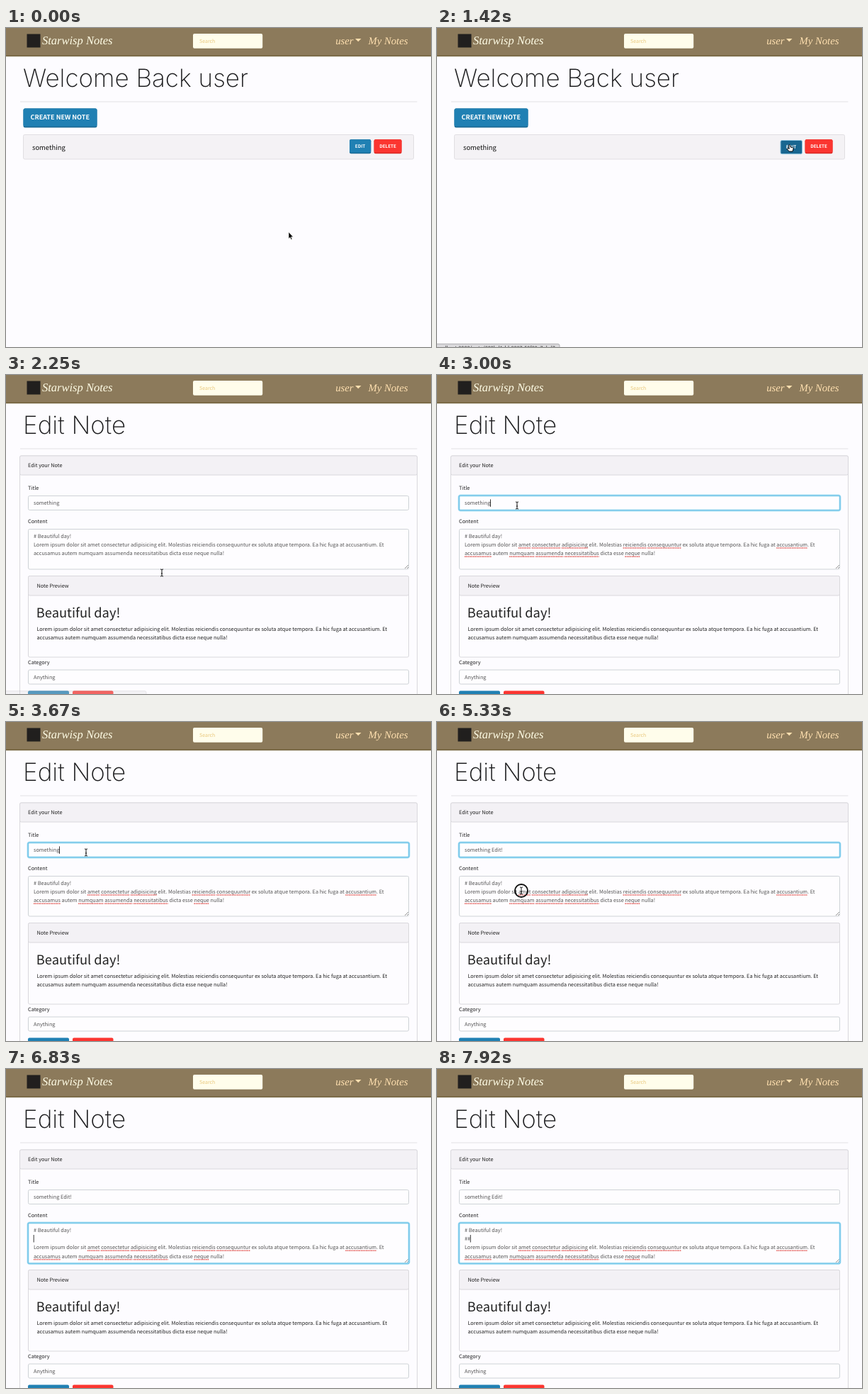
Recreate the animation shown at these times as an HTML page. Size 600 by 450 pixels, loop 8 s.

```html
<!DOCTYPE html>
<html lang="en">
<head>
<meta charset="utf-8">
<title>Note editor</title>
<style>
  html, body { margin: 0; width: 100%; height: 100%; overflow: hidden; background: #fdfcff; }
  svg { display: block; width: 100%; height: 100%; }
  text {
    font: 7.3px "Noto Sans CJK JP", "Noto Sans CJK SC", "Noto Sans CJK", "Open Sans", sans-serif;
    text-rendering: geometricPrecision; white-space: pre; fill: #222;
  }
  text.heading { font: 150 35px Inter, Roboto, sans-serif; fill: #1c1c1e; }
  text.script { font: italic 14.7px "Liberation Serif", "Noto Serif", serif; fill: #ffe0b0; }
  text.brand { font-size: 16.5px; fill: #fffde6; }
  text.button { font-weight: 700; font-size: 6.3px; fill: #fff; text-anchor: middle; }
  text.large { font-size: 9.05px; }
  .value { fill: #555; }
  .panel { fill: #fdfcff; stroke: #d9d8dc; }
  .bar { fill: #f3f1f5; stroke: #d9d8dc; }
  .field { fill: #fefdff; stroke: #ced3d6; }
  .blue { fill: #2080b3; }
  .blue-edge { fill: #1a6a95; }
  .red { fill: #fb3530; }
  .red-edge { fill: #d92823; }
  .ring rect { fill: none; stroke: #72c6ea; stroke-width: 1.6; }
  .ring .glow { stroke: #a9e0f5; stroke-width: 3.4; opacity: .65; }
  .wavy { stroke: #e0504c; stroke-width: 1.5; stroke-dasharray: 1.5 .9; }
</style>
</head>
<body>
<svg viewBox="0 0 600 450" preserveAspectRatio="none">
  <rect width="600" height="450" fill="#fdfcff"/>

  <g id="home">
    <text class="heading" x="24" y="83">Welcome Back user</text>
    <rect class="blue-edge" x="24.5" y="113.5" width="104" height="27" rx="2.5"/>
    <rect class="blue" x="24.5" y="113.5" width="104" height="25.3" rx="2.5"/>
    <text class="button large" x="76.3" y="129.2">CREATE NEW NOTE</text>
    <rect x="24.5" y="150.5" width="551" height="34.5" rx="2" fill="#f4f2f5" stroke="#e0dee2"/>
    <text x="37" y="171.6" style="font-size:9.42px;fill:#111">something</text>
    <g id="editButton">
      <rect class="blue-edge" x="485" y="157.3" width="30.2" height="20" rx="2"/>
      <rect class="blue" x="485" y="157.3" width="30.2" height="18.4" rx="2"/>
      <text class="button" x="500" y="168.8">EDIT</text>
    </g>
    <g id="editHover">
      <rect x="485" y="158.5" width="30.5" height="19.2" rx="2" fill="#186690" stroke="#8fc4de"/>
      <text class="button" x="500" y="170">EDIT</text>
    </g>
    <rect class="red-edge" x="519.6" y="157.3" width="38.9" height="20" rx="2"/>
    <rect class="red" x="519.6" y="157.3" width="38.9" height="18.4" rx="2"/>
    <text class="button" x="539" y="168.8">DELETE</text>
  </g>

  <g id="edit">
    <text class="heading" x="24" y="83">Edit Note</text>
    <rect class="panel" x="19.5" y="114" width="561" height="360" rx="2"/>
    <rect class="bar" x="19.5" y="114" width="561" height="27" rx="2"/>
    <text x="31" y="130">Edit your Note</text>
    <text x="31" y="161.7">Title</text>
    <rect class="field" x="31.5" y="170.5" width="537" height="20" rx="2"/>
    <text x="31" y="208.7">Content</text>
    <rect class="field" x="31.5" y="217.5" width="537" height="56.5" rx="2"/>
    <path d="M563 273l5-5M566 273l2-2" stroke="#777" stroke-width=".8"/>
    <g id="titleRing" class="ring">
      <rect class="glow" x="31" y="170" width="538" height="21" rx="2.5"/>
      <rect x="31" y="170" width="538" height="21" rx="2"/>
    </g>
    <g id="contentRing" class="ring">
      <rect class="glow" x="31" y="217" width="538" height="57.5" rx="2.5"/>
      <rect x="31" y="217" width="538" height="57.5" rx="2"/>
    </g>
    <text id="title" class="value" x="39" y="183.4"></text>
    <text id="first" class="value" x="39" y="229.6"># Beautiful day!</text>
    <text id="typed" class="value" x="39" y="242"></text>
    <g id="body">
      <text class="value" x="39" y="242">Lorem ipsum dolor sit amet consectetur adipisicing elit. Molestias reiciendis consequuntur ex soluta atque tempora. Ea hic fuga at accusantium. Et</text>
      <text class="value" x="39" y="254.4">accusamus autem numquam assumenda necessitatibus dicta esse neque nulla!</text>
      <g id="spelling" class="wavy"></g>
    </g>
    <rect id="caret" width=".9" height="10.5" fill="#222"/>

    <rect class="panel" x="31.5" y="283.5" width="537" height="114.5" rx="2"/>
    <rect class="bar" x="31.5" y="283.5" width="537" height="27.5" rx="2"/>
    <text x="43.5" y="300">Note Preview</text>
    <text x="42.8" y="342.3" style="font-size:18.3px">Beautiful day!</text>
    <text x="43.5" y="361">Lorem ipsum dolor sit amet consectetur adipisicing elit. Molestias reiciendis consequuntur ex soluta atque tempora. Ea hic fuga at accusantium. Et</text>
    <text x="43.5" y="373.3">accusamus autem numquam assumenda necessitatibus dicta esse neque nulla!</text>
    <text x="31" y="407.5">Category</text>
    <rect class="field" x="31.5" y="416" width="537" height="20" rx="2"/>
    <text class="value" x="39" y="429">Anything</text>
    <rect class="blue" x="31" y="445.5" width="58" height="20" rx="2"/>
    <rect class="red" x="94" y="445.5" width="57.5" height="20" rx="2"/>
  </g>

  <path d="M20 104H580.5" stroke="#e2e1e5"/>
  <rect width="600" height="40.2" fill="#74643f"/>
  <rect width="600" height="38.5" fill="#8c7a5b"/>
  <rect x="29.5" y="8.5" width="19" height="19" fill="#211f1e"/>
  <text class="script brand" x="51" y="23">Starwisp Notes</text>
  <rect x="264" y="8" width="98.2" height="20.7" rx="2" fill="#fffdeb"/>
  <text x="273" y="21" style="font-size:7px;fill:#e9c87c">Search</text>
  <text class="script" x="490.5" y="23.2" text-anchor="end">user</text>
  <path d="M493 15h8.5l-4.25 4.3z" fill="#ffe0b0"/>
  <text class="script" x="511.5" y="23.2">My Notes</text>

  <g id="status">
    <rect id="statusBox" x="-3" y="445.8" height="12" rx="2" fill="#dcdbde" stroke="#a9a8ac"/>
    <text id="statusText" x="-3" y="453.6">localhost:3000/note/609bd1dd-8087-50f09c7abd7</text>
  </g>

  <g id="pointer">
    <path id="arrow" d="M0 0V9.5L2.1 7.6 3.5 10.8 5 10.1 3.6 7H6.4Z" fill="#000" stroke="#fff" stroke-width=".6"/>
    <path id="hand" d="M-1.5-.3Q-.5-1.2.3-.2L1.2 2.6 4 3Q5.2 3.6 5 5.4L4 8.6H-.6L-3.6 5.6Q-4 4.2-2.4 4.3L-.8 5Z" fill="#fff" stroke="#000" stroke-width="1"/>
    <path id="beam" d="M-2-5Q0-5 0-4Q0-5 2-5M0-4V4M-2 5Q0 5 0 4Q0 5 2 5M-1 1H1" fill="none" stroke="#111" stroke-width="1"/>
    <circle id="click" r="9" fill="none" stroke="#111" stroke-width="1.9"/>
  </g>
</svg>

<script>
const LOOP = 8000, STEP = 1000 / 12;
const el = id => document.getElementById(id);
const show = (id, on) => { el(id).style.display = on ? "" : "none"; };
const between = (t, a, b) => t >= a && t < b;

const PAGE_CHANGE = 1580, STATUS_FADE = 2000, STATUS_END = 2350;
const TITLE_FOCUS = 2580, CONTENT_FOCUS = 5410, LINE_END = 5910, ENTER = 6490;
const titleKeys = [3910, 4080, 4160, 4250, 4410, 4580];
const hashKeys = [7330, 7740];
const clicks = [[1250, 1410], [2580, 2740], [5330, 5490], [5830, 5990]];
const hidden = [[3910, 4740], [ENTER, LOOP]];
const moves = [
  [0, 399, 287.8], [416, 399, 287.8], [1080, 498, 165.5], [1750, 498, 165.5],
  [2250, 220, 279], [2580, 113, 184], [4660, 113, 184], [5240, 119, 238],
  [5490, 119, 238], [5830, 97, 228], [LOOP, 97, 228]
];

function pointerAt(t) {
  const i = moves.findIndex(m => m[0] > t);
  const [t0, x0, y0] = moves[i - 1], [t1, x1, y1] = moves[i];
  const p = (t - t0) / (t1 - t0), e = p * p * (3 - 2 * p);
  return [x0 + (x1 - x0) * e, y0 + (y1 - y0) * e];
}

function underlineMisspelled() {
  const unknown = /\b(amet|consectetur|adipisicing|reiciendis|consequuntur|accusantium|accusamus|numquam|assumenda|necessitatibus|neque)\b/g;
  for (const line of el("body").querySelectorAll("text")) {
    const y = +line.getAttribute("y") + 1.9;
    for (const word of line.textContent.matchAll(unknown)) {
      const x = line.getStartPositionOfChar(word.index).x;
      const mark = document.createElementNS("http://www.w3.org/2000/svg", "path");
      mark.setAttribute("d", `M${x} ${y}h${line.getSubStringLength(word.index, word[0].length)}`);
      el("spelling").append(mark);
    }
  }
}

function setText(id, value) {
  if (el(id).textContent !== value) el(id).textContent = value;
}

function drawCaret(t) {
  const line = t < CONTENT_FOCUS ? "title" : t < ENTER ? "first" : "typed";
  const events = [TITLE_FOCUS, ...titleKeys, CONTENT_FOCUS, LINE_END, ENTER, ...hashKeys];
  const last = Math.max(...events.filter(time => time <= t));
  show("caret", t >= TITLE_FOCUS && (t - last) % 1000 < 500 && !between(t, CONTENT_FOCUS, LINE_END));
  const text = el(line);
  const width = text.textContent ? text.getComputedTextLength() : 0;
  el("caret").setAttribute("x", 39 + width - .3);
  el("caret").setAttribute("y", +text.getAttribute("y") - 8);
}

function drawPointer(t, hover) {
  const [x, y] = pointerAt(t);
  el("pointer").setAttribute("transform", `translate(${x} ${y})`);
  show("pointer", !hidden.some(([a, b]) => between(t, a, b)));
  const beam = t >= 1900;
  show("hand", hover);
  show("beam", beam);
  show("arrow", !hover && !beam);
  show("click", clicks.some(([a, b]) => between(t, a, b)));
}

function draw(t) {
  const home = t < PAGE_CHANGE, hover = home && t >= 1000;
  show("home", home);
  show("edit", !home);
  show("editButton", !hover);
  show("editHover", hover);

  show("status", between(t, 1000, STATUS_END));
  el("status").style.opacity = Math.min(1, Math.max(0, (STATUS_END - t) / (STATUS_END - STATUS_FADE)));
  el("statusBox").setAttribute("width", home ? 176 : 201);
  show("statusText", home);

  const typed = titleKeys.filter(time => time <= t).length;
  setText("title", "something" + " Edit!".slice(0, typed));
  setText("typed", "#".repeat(hashKeys.filter(time => time <= t).length));
  el("body").setAttribute("transform", `translate(0 ${t >= ENTER ? 12.4 : 0})`);
  show("spelling", t >= TITLE_FOCUS);
  show("titleRing", between(t, TITLE_FOCUS, CONTENT_FOCUS));
  show("contentRing", t >= CONTENT_FOCUS);
  drawCaret(t);
  drawPointer(t, hover);
}

underlineMisspelled();
const start = performance.now();
function tick() {
  const t = (performance.now() - start) % LOOP;
  draw(Math.floor((t + 4) / STEP) * STEP % LOOP);
  requestAnimationFrame(tick);
}
tick();
</script>
</body>
</html>
```
